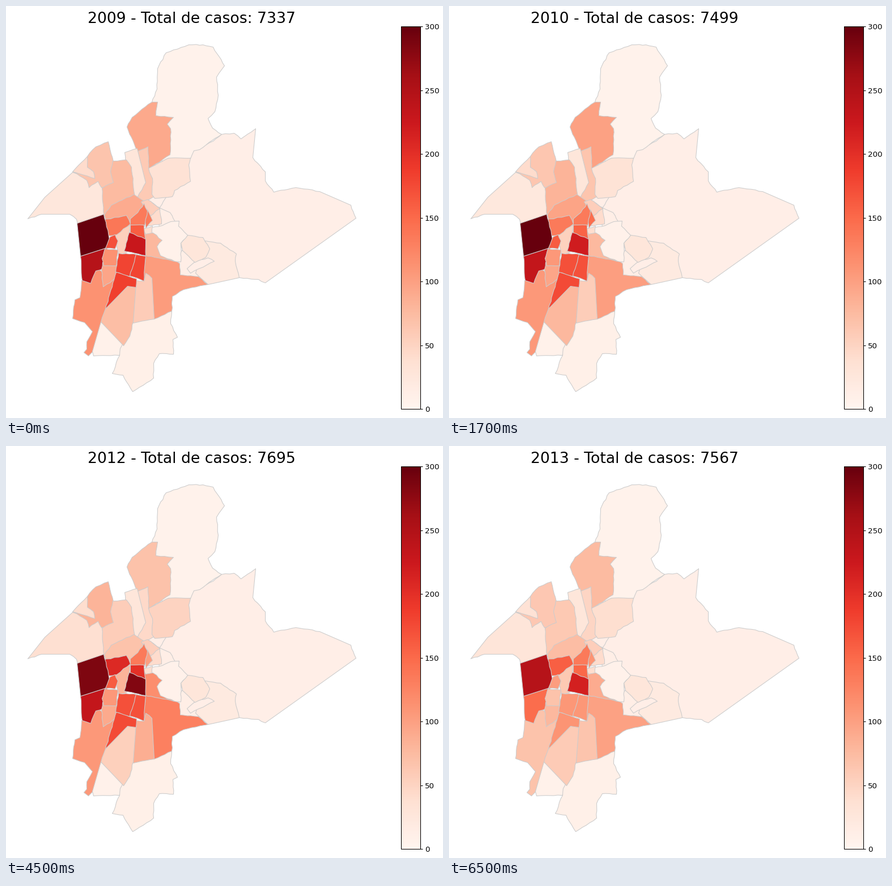
Recreate the animation shown at these times as a matplotlib script. Size 771 by 727 pixels, loop 8000 ms.

```python
import math
import random

import matplotlib.pyplot as plt
from matplotlib.animation import FuncAnimation
from matplotlib.cm import ScalarMappable
from matplotlib.colors import Normalize
from matplotlib.patches import Polygon

WIDTH, HEIGHT, DPI = 771, 727, 100
STEP, FRAMES = 500, 16
FIRST_YEAR = 2009
TOTALS = [7337, 7499, 6615, 7695, 7567]
LINE = 0.77

# Yearly course of the cases, relative to a district's base level.
STEADY = [1, 1, 1, 1, 1]
EASING = [1, 1, 0.9, 0.95, 0.82]
FADING = [1, 0.95, 0.85, 0.95, 0.6]
DIPPING = [1, 1.08, 1, 0.75, 0.82]
BUMP = [1, 0.97, 0.97, 1.24, 0.95]
SURGE = [1, 0.98, 0.92, 1.5, 1.15]

plt.rcParams["font.family"] = "DejaVu Sans"
fig = plt.figure(figsize=(WIDTH / DPI, HEIGHT / DPI), dpi=DPI, facecolor="white")
ax = fig.add_axes([0, 0, 1, 1])
ax.set(xlim=(-0.5, WIDTH - 0.5), ylim=(HEIGHT - 0.5, -0.5))
ax.axis("off")

rng = random.Random(5)
shades = ScalarMappable(Normalize(0, 300), "Reds")
districts = []


def ragged(corners, spacing=7, amount=0.8, straight=48):
    """Roughen the short sides of a polygon; long sides stay straight."""
    points = []
    for (x0, y0), (x1, y1) in zip(corners, corners[1:] + corners[:1]):
        length = math.hypot(x1 - x0, y1 - y0)
        parts = max(1, round(length / spacing)) if length < straight else 1
        points.append((x0, y0))
        for i in range(1, parts):
            t = i / parts
            points.append((x0 + (x1 - x0) * t + rng.uniform(-amount, amount),
                           y0 + (y1 - y0) * t + rng.uniform(-amount, amount)))
    return points


def district(base, course, *corners):
    """Add a district; later ones cover the overlap with earlier ones."""
    patch = Polygon(ragged(list(corners)), ec="0.8", lw=LINE, joinstyle="round")
    ax.add_patch(patch)
    districts.append((patch, [base * c for c in course]))


# East and north
district(12, STEADY, (320, 268), (331, 254), (365, 238), (380, 226), (402, 224),
         (414, 234), (432, 222), (440, 216), (435, 267), (457, 292), (457, 308),
         (472, 328), (511, 320), (553, 327), (608, 351), (617, 374), (457, 488),
         (445, 482), (412, 479), (330, 460), (268, 356))
district(7, STEADY, (257, 169), (266, 146), (267, 110), (282, 82), (322, 68),
         (347, 68), (365, 72), (385, 105), (371, 125), (374, 157), (368, 186),
         (356, 198), (364, 215), (380, 226), (358, 240), (341, 253), (331, 255),
         (325, 269), (275, 275))

# Centre north
district(12, STEADY, (249, 341), (254, 330), (285, 332), (270, 356))
district(60, DIPPING, (231, 256), (249, 248), (262, 255), (265, 335),
         (240, 346), (222, 330))
district(92, DIPPING, (267, 169), (257, 169), (222, 196), (213, 213), (231, 256),
         (250, 248), (251, 287), (289, 262), (290, 216), (284, 208), (295, 196),
         (264, 193))
district(34, SURGE, (286, 268), (325, 268), (322, 280), (325, 309), (297, 325),
         (293, 336), (262, 339), (257, 332), (258, 304), (251, 286))
district(28, STEADY, (209, 258), (231, 251), (246, 311), (232, 336), (225, 336),
         (215, 277), (210, 272))

# West
district(25, SURGE, (38, 375), (68, 337), (117, 293), (170, 310), (182, 375),
         (126, 384), (124, 376), (112, 367), (62, 367))
district(42, EASING, (143, 265), (117, 292), (157, 307), (166, 300), (160, 280))
district(66, BUMP, (180, 239), (189, 274), (195, 285), (195, 315), (168, 320),
         (162, 309), (146, 320), (142, 307), (117, 292), (156, 304), (154, 292),
         (143, 284), (143, 265), (158, 248))
district(75, DIPPING, (188, 273), (212, 271), (221, 284), (226, 331), (232, 345),
         (172, 368), (169, 321), (189, 311), (184, 292))
district(90, DIPPING, (173, 368), (185, 351), (225, 332), (248, 348), (243, 376),
         (215, 386), (175, 380))

# South-east
district(13, STEADY, (295, 449), (311, 430), (342, 450), (342, 480), (300, 478))
district(20, STEADY, (351, 414), (378, 418), (406, 437), (404, 450), (411, 479),
         (356, 491), (334, 471))
district(12, STEADY, (319, 463), (334, 450), (356, 444), (367, 450), (340, 463),
         (325, 471))
district(28, STEADY, (320, 404), (347, 408), (359, 428), (352, 443), (333, 452),
         (311, 431), (308, 418))

# South
district(113, FADING, (133, 484), (160, 462), (195, 485), (172, 570), (152, 610),
         (145, 617), (137, 611), (142, 605), (142, 592), (152, 574), (138, 558),
         (117, 551), (121, 518), (130, 514))
district(8, STEADY, (167, 557), (185, 560), (215, 595), (199, 616), (154, 617),
         (152, 609))
district(10, STEADY, (224, 555), (292, 538), (290, 560), (302, 584), (294, 588),
         (295, 614), (270, 613), (260, 630), (260, 656), (223, 680), (206, 651),
         (187, 648), (200, 616), (201, 604), (210, 585))
district(104, BUMP, (246, 436), (285, 440), (306, 454), (307, 474), (339, 477),
         (356, 491), (313, 500), (293, 512), (292, 538), (261, 552), (242, 480))
district(58, SURGE, (225, 483), (243, 485), (246, 471), (257, 480), (261, 552),
         (224, 559))
district(72, DIPPING, (175, 534), (210, 488), (229, 490), (224, 557), (218, 582),
         (207, 599), (167, 557))

# Centre east
district(14, STEADY, (268, 354), (289, 364), (298, 380), (270, 390))
district(8, STEADY, (250, 391), (275, 387), (290, 380), (305, 379), (304, 388),
         (320, 404), (308, 418), (308, 451), (296, 450), (262, 440))
district(42, STEADY, (252, 364), (271, 356), (274, 384), (248, 388))
district(56, STEADY, (238, 345), (249, 341), (271, 357), (253, 371))
district(78, SURGE, (243, 398), (259, 400), (275, 413), (266, 424), (272, 440),
         (297, 450), (262, 443), (244, 439))
district(40, STEADY, (240, 393), (258, 388), (257, 400), (246, 402))
district(135, DIPPING, (242, 360), (249, 359), (258, 378), (246, 392))
district(135, STEADY, (243, 348), (249, 361), (244, 389), (218, 390), (219, 375),
         (232, 364))

# Centre
district(54, SURGE, (190, 400), (219, 386), (213, 434), (198, 440))
district(138, SURGE, (170, 377), (212, 369), (219, 384), (195, 403), (173, 406))
district(245, FADING, (131, 441), (178, 426), (180, 460), (158, 467), (149, 489),
         (134, 484))
district(300, EASING, (125, 383), (172, 367), (182, 411), (178, 426), (131, 441))
district(95, EASING, (168, 465), (170, 452), (199, 452), (194, 480), (171, 495))
district(113, FADING, (174, 428), (197, 430), (194, 458), (172, 458), (169, 445))
district(170, FADING, (183, 407), (192, 403), (197, 414), (192, 428), (175, 427))
district(185, FADING, (194, 469), (230, 481), (229, 496), (214, 494), (175, 534),
         (187, 495))
district(180, FADING, (198, 436), (230, 438), (219, 477), (193, 469))
district(180, FADING, (229, 438), (246, 441), (243, 485), (218, 476))
district(160, BUMP, (219, 386), (243, 386), (246, 413), (218, 404))
district(228, BUMP, (217, 399), (246, 411), (246, 440), (208, 432))

title = ax.text(327, 29, "", size=19.2, ha="center", va="baseline")

# Colour scale
left, right, top, bottom = 697.4, 731.4, 36, 711.3
cax = fig.add_axes([left / WIDTH, 1 - bottom / HEIGHT,
                    (right - left) / WIDTH, (bottom - top) / HEIGHT])
bar = fig.colorbar(shades, cax=cax, ticks=range(0, 301, 50))
bar.outline.set_linewidth(LINE)
cax.tick_params(labelsize=9.6, length=2.9, width=LINE, pad=2.6)


def update(frame):
    # The loop opens 1500 ms into the first year; each year lasts 2000 ms.
    year = (frame * STEP + 1500) // 2000
    title.set_text(f"{FIRST_YEAR + year} - Total de casos: {TOTALS[year]}")
    for patch, cases in districts:
        patch.set_facecolor(shades.to_rgba(cases[year]))


anim = FuncAnimation(fig, update, frames=FRAMES, interval=STEP,
                     repeat=True, repeat_delay=0)
plt.show()
```
